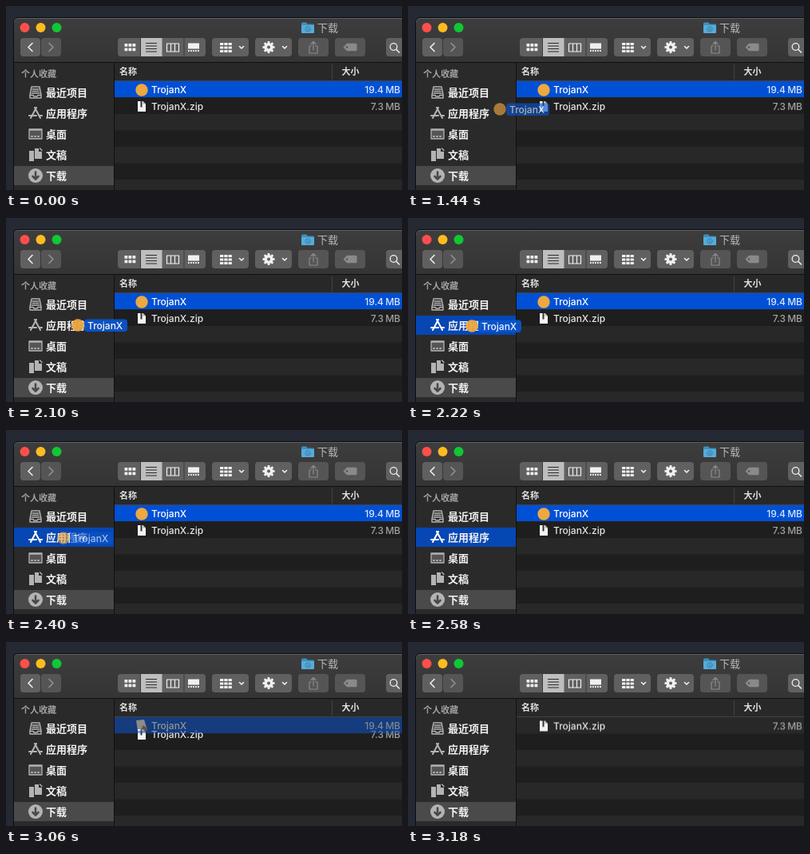
An HTML page that plays this animation: 496 px wide and 230 px high, repeating every 4380 ms.

```html
<!DOCTYPE html>
<html lang="zh-CN">
<head>
<meta charset="utf-8">
<title>拖动到应用程序</title>
<style>
  html, body { margin: 0; width: 100%; height: 100%; overflow: hidden; background: #242933; }
  svg { display: block; width: 496px; height: 230px; }
  text { font-family: Inter, "Noto Sans CJK SC", "Noto Sans CJK", sans-serif; font-size: 12px; font-weight: 500; fill: #e6e6e6; }
  .side { font-size: 13px; font-weight: 700; fill: #f2f2f2; }
  .head { font-size: 11px; font-weight: 600; fill: #e2e2e2; }
  .size { text-anchor: end; word-spacing: -1px; }
  .line { fill: none; stroke: currentColor; stroke-width: 1.6; stroke-linecap: round; stroke-linejoin: round; }
  .thin { stroke-width: 1.2; }
  .fill { fill: currentColor; }
</style>
</head>
<body>
<svg viewBox="0 0 496 230">
  <defs>
    <linearGradient id="bar" x2="0" y2="1">
      <stop stop-color="#3e3d3e"/><stop offset="1" stop-color="#353435"/>
    </linearGradient>
    <clipPath id="window"><path d="M10 230V21Q10 15 16 15H496V230Z"/></clipPath>
    <g id="app"><circle r="7.7" fill="#eda840"/></g>
  </defs>

  <rect width="496" height="230" fill="#242933"/>
  <path d="M9.500 230V21Q9.500 14.500 16 14.500H496" fill="none" stroke="#0c0d10"/>
  <g clip-path="url(#window)">
    <rect x="10" y="15" width="486" height="56" fill="url(#bar)"/>
    <path d="M10 21Q10 15.500 16 15.500H496" fill="none" stroke="#626263"/>
    <rect x="10" y="71" width="126" height="159" fill="#2b2a2b"/>
    <rect x="136" y="71" width="360" height="159" fill="#1e1e1e"/>
    <g id="stripes"></g>
    <rect x="136" y="71" width="360" height="23" fill="#292829"/>
    <path d="M136 93.500H496M408.500 73V92" stroke="#434343"/>
    <path d="M10 70.500H496M135.500 71V230" stroke="#101010"/>
  </g>

  <circle cx="23.500" cy="27" r="6" fill="#ff4f4a"/>
  <circle cx="43.500" cy="27" r="6" fill="#ffbc1f"/>
  <circle cx="63.500" cy="27" r="6" fill="#0fc834"/>

  <path d="M370 22Q370 20.500 371.500 20.500H376L378 22.500H384.500Q386 22.500 386 24V32.500Q386 34 384.500 34H371.500Q370 34 370 32.500Z" fill="#3c8fbd"/>
  <path d="M370 24H386V32.500Q386 34 384.500 34H371.500Q370 34 370 32.500Z" fill="#56abd8"/>
  <circle cx="378" cy="29" r="3.200" class="line" color="#3a86b2" style="stroke-width:1"/>
  <path class="line" color="#3a86b2" style="stroke-width:1" d="M378 27.500V30.500M376.800 29.500L378 30.700L379.200 29.500"/>
  <text x="390" y="32" style="font-size:13px;font-weight:400;fill:#b9b9b9">下载</text>

  <g id="buttons"></g>
  <g color="#f0f0f0">
    <path class="line" d="M33 46.500L28 51.500L33 56.500"/>
    <path class="line" color="#929192" d="M54 46.500L59 51.500L54 56.500"/>
    <g id="grid" class="fill"></g>
    <path class="line thin" color="#2b2b2b" d="M175.500 46.500H188.500M175.500 50H188.500M175.500 53.500H188.500M175.500 57H188.500"/>
    <path class="line thin" d="M201.500 47H216.500V57H201.500ZM206.500 47V57M211.500 47V57"/>
    <path class="fill" d="M228 46.500H242V53.500H228Z"/>
    <path class="line" stroke-dasharray="1.800 1.200" style="stroke-width:2;stroke-linecap:butt" d="M228 56H242"/>
    <path class="line" d="M292.500 50.500L295 53L297.500 50.500M346.500 50.500L349 53L351.500 50.500"/>
    <g id="gear"></g>
    <g color="#8b8a8b">
      <path class="line thin" d="M382.500 50H380V59H390V50H387.500M385 55V44.500M382 47.500L385 44.500L388 47.500"/>
      <path class="fill" d="M422.500 51.500L427 46.800H438Q439.500 46.800 439.500 48.300V54.700Q439.500 56.200 438 56.200H427Z"/>
      <circle cx="427" cy="51.500" r="1.300" fill="#565556"/>
    </g>
    <circle class="line" cx="485.500" cy="51" r="4.300" style="stroke-width:1.300"/>
    <path class="line" style="stroke-width:1.500" d="M489 54.500L492.500 58"/>
  </g>

  <text x="19" y="89" style="font-size:11px;font-weight:700;fill:#a3a2a3">个人收藏</text>
  <text class="head" x="142" y="86">名称</text>
  <text class="head" x="420.500" y="86">大小</text>

  <rect x="10" y="200" width="125" height="24" fill="#4b4a4b"/>
  <rect id="target" x="10" y="122" width="125" height="24" fill="#0647b4"/>
  <g id="sidebar"></g>

  <g id="zip">
    <path d="M165 119H171.500L175 122.500V132H165Z" fill="#f4f4f4"/>
    <path d="M171.500 119V122.500H175Z" fill="#b5b5b5"/>
    <path d="M169.500 119V126.500" stroke="#333" stroke-width="2"/>
    <text x="182" y="130">TrojanX.zip</text>
    <text class="size" x="494" y="130" style="fill:#a2a2a2">7.3 MB</text>
  </g>
  <g id="selected">
    <rect x="136" y="94" width="360" height="20" fill="#0050d5"/>
    <use id="appIcon" href="#app" x="170" y="105"/>
    <g id="plainIcon">
      <path d="M163 98L173 97L177 110L165 111Z" fill="#f0efed"/>
      <path d="M168 111L172 104L177 108V111Z" fill="#9c7b66"/>
    </g>
    <text x="182" y="109" style="fill:#fff">TrojanX</text>
    <text class="size" x="494" y="109" style="fill:#dbe6fa">19.4 MB</text>
  </g>

  <g id="drag">
    <rect x="8" y="-7.500" width="54" height="15.500" rx="4" fill="#0a55cc"/>
    <use href="#app"/>
    <text x="12" y="4.500" style="fill:#fff">TrojanX</text>
  </g>
</svg>

<script>
const LOOP = 4380;
const $ = id => document.getElementById(id);

const rect = (x, y, w, h, fill, rx = 0) =>
  `<rect x="${x}" y="${y}" width="${w}" height="${h}" rx="${rx}" fill="${fill}"/>`;
const line = (d, width = 1.6) => `<path class="line" style="stroke-width:${width}" d="${d}"/>`;

$('stripes').innerHTML = [0, 2, 4, 6].map(i => rect(136, 94 + i * 20.5, 360, 20.5, '#292829')).join('');

const buttons = [[18, 25], [44, 25], [140, 110], [258, 46], [312, 46], [366, 38], [412, 38], [476, 30]];
$('buttons').innerHTML = buttons.map(([x, w], i) =>
  rect(x, 40, w, 23, [1, 5, 6].includes(i) ? '#565556' : '#616061', 4)).join('') +
  rect(169, 40, 26.5, 23, '#bfbebf') +
  [168, 222.5].map(x => rect(x, 40, 1, 23, '#3c3b3c')).join('');

let dots = '';
for (let c = 0; c < 3; c++) {
  for (const y of [47, 52.5]) dots += rect(148.5 + c * 5, y, 3.8, 3.8, 'currentColor', .6);
  for (const y of [46, 50.5, 55]) dots += rect(268 + c * 5.3, y, 4.3, 3, 'currentColor', .5);
}
$('grid').innerHTML = dots;

$('gear').innerHTML = '<circle class="line" cx="329" cy="51.500" r="3.800" style="stroke-width:3.600"/>' +
  Array.from({ length: 8 }, (_, i) =>
    `<rect x="327.600" y="44" width="2.800" height="3" fill="currentColor" transform="rotate(${i * 45} 329 51.500)"/>`).join('');

const places = [
  ['最近项目', line('M-7 3L-5-7H5L7 3V7H-7ZM-4-4H4M-4-1.500H4M-5 1H5M-7 3.500H-3L-2 5H2L3 3.500H7', 1.4)],
  ['应用程序', line('M1-7L-6 6M-1-7L6 6M-8 3H1M5 3H8', 2)],
  ['桌面', '<path d="M-8-6H8V6H-8Z" fill="#555"/>' + line('M-8-6H8V6H-8ZM-8-5H8', 1.3) + line('M-5 3H-4M-1 3H0M3 3H4', 1.8)],
  ['文稿', '<path class="fill" d="M-8-5H-2V8H-8ZM-1-8H4V-4H8V5H-1Z"/>' + line('M5.500-8L8-5.500', 1.4)],
  ['下载', '<circle class="fill" r="9"/><path class="line" color="#4b4a4b" style="stroke-width:2.600" d="M0-4.500V4M-3.500 1L0 4.500L3.500 1"/>'],
];
$('sidebar').innerHTML = places.map(([name, icon], i) => {
  const y = 108 + i * 26;
  return `<g id="place${i}" color="#b4b3b4" transform="translate(37 ${y})">${icon}</g>
    <text class="side" x="50" y="${y + 5}">${name}</text>`;
}).join('');

// Each step is [start in ms, style], held until the next one.
function play(el, steps) {
  const frames = steps.map(([ms, style]) => ({ offset: ms / LOOP, easing: 'step-end', ...style }));
  frames.push({ ...frames.at(-1), offset: 1 });
  el.animate(frames, { duration: LOOP, iterations: Infinity });
}

const path = [
  [0, 115, 129, 0],
  [1440, 115, 129, .65], [1500, 110, 130, .8], [1560, 106, 132, .9], [1680, 103.5, 133, .95],
  [1860, 101, 133, .95], [1920, 99, 133, .95], [1980, 96, 133, .95], [2040, 93, 134, .95],
  [2100, 90, 134, .95], [2160, 86, 134, .95], [2220, 80, 135, .95], [2340, 73, 135, .9],
  [2400, 72, 135, .65], [2460, 72, 135, .4], [2520, 72, 135, .2], [2580, 72, 135, 0],
];
play($('drag'), path.map(([ms, x, y, opacity]) => [ms, { transform: `translate(${x}px, ${y}px)`, opacity }]));

const show = (el, from, to) =>
  play(el, [[0, { opacity: 0 }], [from, { opacity: 1 }], [to, { opacity: 0 }]]);
show($('target'), 2220, 2940);
show($('plainIcon'), 2940, 3180);
play($('place1'), [[0, { color: '#b4b3b4' }], [2220, { color: '#fff' }], [2940, { color: '#b4b3b4' }]]);
play($('appIcon'), [[0, { opacity: 1 }], [2940, { opacity: 0 }]]);

const removal = [[0, 0, 1], [3000, 3, .8], [3060, 10, .5], [3120, 17, .2], [3180, 20.5, 0]];
play($('zip'), removal.map(([ms, up]) => [ms, { transform: `translateY(${-up}px)` }]));
play($('selected'), removal.map(([ms, , opacity]) => [ms, { opacity }]));
</script>
</body>
</html>
```
